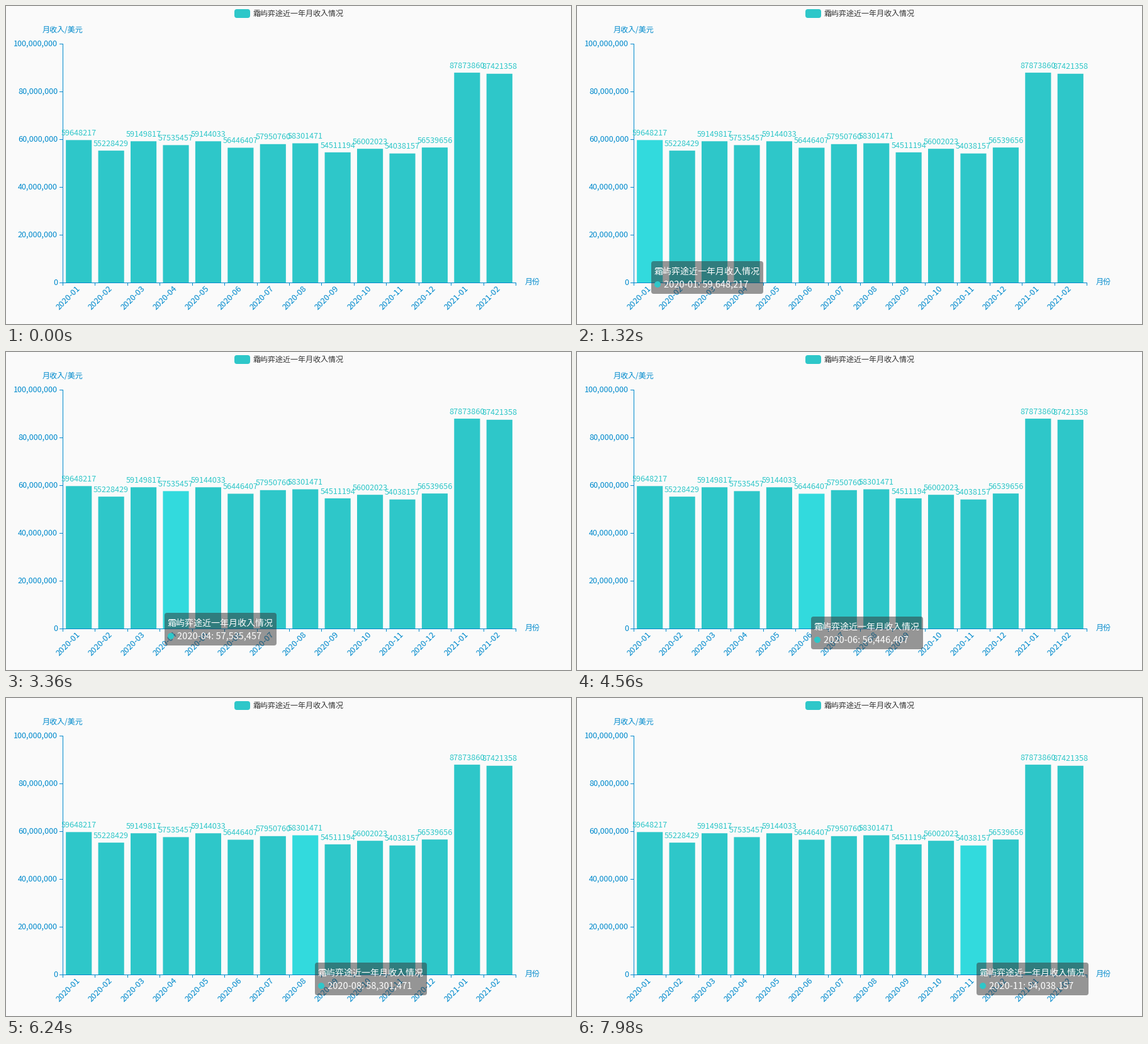
These frames come from a looping animation (898 by 506 pixels, 8000 ms). A matplotlib script:

```python
import numpy as np
import matplotlib.pyplot as plt
from matplotlib.animation import FuncAnimation
from matplotlib.patches import Circle, FancyBboxPatch, Rectangle

W, H, DPI = 898, 506, 64
TEAL, BRIGHT, BLUE = "#2ec7c9", "#32dadd", "#008acd"
LEFT, RIGHT, TOP, BASE = 90, 810, 60, 440
TITLE = "霜屿弈途近一年月收入情况"
REVENUE = [59648217, 55228429, 59149817, 57535457, 59144033, 56446407, 57950760,
           58301471, 54511194, 56002023, 54038157, 56539656, 87873860, 87421358]
MONTHS = [f"{2020 + i // 12}-{i % 12 + 1:02d}" for i in range(len(REVENUE))]
BAND = (RIGHT - LEFT) / len(REVENUE)
DIGITS = 12.6
INTERVAL, FRAMES, STEP = 40, 200, 60

plt.rcParams["font.family"] = "Noto Sans CJK JP"
fig = plt.figure(figsize=(W / DPI, H / DPI), dpi=DPI, facecolor="#fafafa")
ax = fig.add_axes([0, 0, 1, 1])
ax.set(xlim=(0, W), ylim=(H, 0))
ax.axis("off")


def label(x, y, text, px, color, ha="left", **kw):
    """Text whose glyphs are centred vertically on y."""
    return ax.text(x, y + 0.37 * px, text, fontsize=px * 72 / DPI, color=color,
                   ha=ha, va="baseline", **kw)


def line(x0, y0, x1, y1):
    ax.plot([x0, x1], [y0, y1], color=BLUE, lw=72 / DPI, snap=False,
            solid_capstyle="butt", zorder=3)


def rounded(x, y, w, h, color, **kw):
    return ax.add_patch(FancyBboxPatch(
        (x, y), w, h, boxstyle="round,pad=0,rounding_size=4",
        facecolor=color, lw=0, **kw))


# Legend and axis names
rounded(363, 5, 25, 14, TEAL)
label(393, 11, TITLE, 12, "#333333")
label(LEFT, 38, "月收入/美元", 12, BLUE, "center")
label(825, 438.5, "月份", 12, BLUE)

# Axes
line(LEFT + .5, TOP, LEFT + .5, BASE + 1)
line(LEFT, BASE + .5, RIGHT + 1, BASE + .5)
for k in range(6):
    y = BASE - k * (BASE - TOP) / 5
    line(LEFT - 5, y + .5, LEFT, y + .5)
    label(82, y - 1, f"{k * 20_000_000:,}", DIGITS, BLUE, "right")
for k in range(len(REVENUE) + 1):
    x = round(LEFT + BAND * k) + .5
    line(x, BASE, x, BASE + 5)

# Bars with their values and months
bars = []
for k, value in enumerate(REVENUE):
    height = value * (BASE - TOP) / 1e8
    x = LEFT + BAND * k
    center = x + BAND / 2
    bars.append(ax.add_patch(Rectangle(
        (x + BAND * .1, BASE - height), BAND * .8, height,
        facecolor=TEAL, lw=0, snap=False)))
    label(center, BASE - height - 12, str(value), DIGITS, TEAL, "center", zorder=4)
    label(center + 2.3, BASE + 5.5, MONTHS[k], 13, BLUE, "right",
          rotation=45, rotation_mode="anchor")

# Tooltip
box = rounded(0, 0, 178, 52, (50 / 255, 50 / 255, 50 / 255, .5), zorder=10)
dot = ax.add_patch(Circle((0, 0), 5, facecolor=TEAL, lw=0, zorder=11))
heading = label(0, 0, TITLE, 14, "white", zorder=11)
reading = label(0, 0, "", 14.6, "white", zorder=11)
tooltip = [box, dot, heading, reading]

# Each visit of the pointer: the bar it holds, if any, and the tooltip's
# way as key points (time in ms, x, y).
VISITS = [
    (1, [(360, 541, 380), (480, 205, 388)]),
    (None, [(900, 140, 393), (1320, 118, 406), (1680, 162, 415), (2340, 246, 415)]),
    (None, [(3360, 252, 415), (4560, 372, 421), (4980, 390, 421), (5820, 484, 421),
            (6240, 491, 421), (7260, 587, 421), (7980, 635, 421)]),
]
TRAIL = 7  # tooltip offset from the pointer, less its lag


def pointer(t):
    """Hovered bar and tooltip corner, or None while the pointer is away."""
    for held, path in VISITS:
        times, xs, ys = zip(*path)
        if times[0] <= t < times[-1] + STEP:
            x, y = np.interp(t, times, xs), np.interp(t, times, ys)
            under = int((x - TRAIL - LEFT) // BAND)
            return under if held is None else held, round(x), round(y)
    return None


def draw(n):
    state = pointer((n * INTERVAL + INTERVAL // 2) // STEP * STEP)
    for k, bar in enumerate(bars):
        bar.set_facecolor(BRIGHT if state and state[0] == k else TEAL)
    for part in tooltip:
        part.set_visible(state is not None)
    if state:
        k, x, y = state
        box.set_bounds(x, y, 178, 52)
        dot.center = (x + 10, y + 37)
        heading.set_position((x + 5, y + 21))
        reading.set_position((x + 20, y + 41.5))
        reading.set_text(f"{MONTHS[k]}: {REVENUE[k]:,}")
    return [*bars, *tooltip]


anim = FuncAnimation(fig, draw, frames=FRAMES, interval=INTERVAL,
                     repeat=True, repeat_delay=0, blit=False)
plt.show()
```
